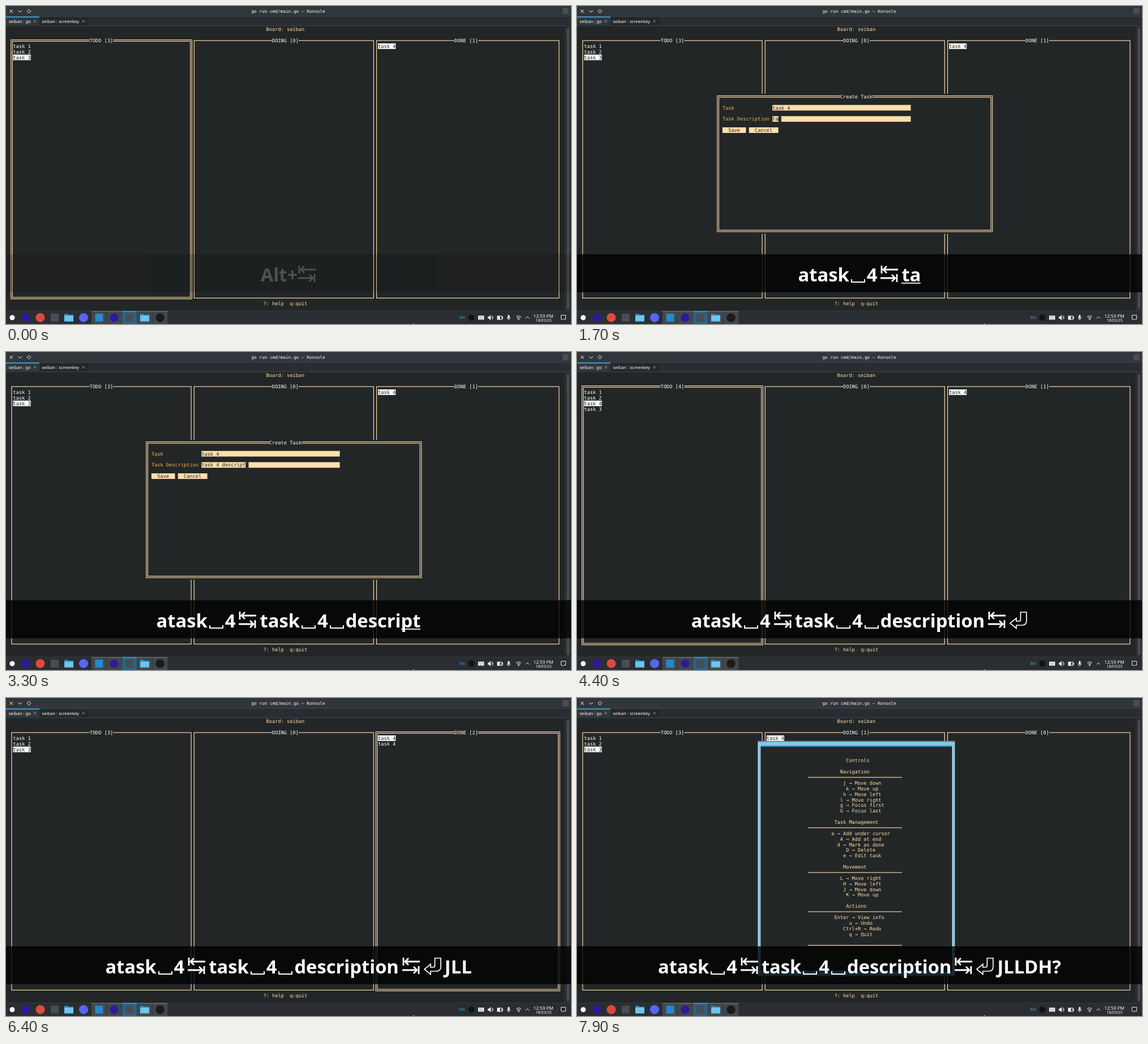
An HTML page that plays this animation: 998 px wide and 561 px high, repeating every 8000 ms.

```html
<!DOCTYPE html>
<html lang="en">
<head>
<meta charset="utf-8">
<title>Kanban board in a terminal</title>
<style>
html, body { margin: 0; width: 100%; height: 100%; overflow: hidden; background: #232627; }
#stage { position: absolute; left: 0; top: 0; width: 998px; height: 561px; overflow: hidden; }
#stage > svg { position: absolute; left: 0; top: 0; }
text { white-space: pre; text-rendering: geometricPrecision; }
.mono { font-family: "DejaVu Sans Mono", monospace; font-size: 8.634px; }
.ui { font-family: "Noto Sans", sans-serif; font-size: 7.7px; fill: #fcfcfc; }
.line { fill: none; stroke: #fcfcfc; stroke-width: 1; }
#band {
  position: absolute; left: 0; top: 438px; width: 998px; height: 67px;
  background: rgba(0, 0, 0, .8); color: #fff; text-align: center; white-space: pre;
  font: bold 32.7px/67px "Noto Sans", "Open Sans", sans-serif;
}
#keys { position: relative; top: 1.8px; height: 67px; }
#keys svg { height: 32px; vertical-align: -3px; fill: none; stroke: #fff; }
#keys i { display: inline-block; width: 5px; }
#keys u {
  text-decoration: none;
  background: linear-gradient(#fff, #fff) 0 37px / 100% 1.7px no-repeat;
}
</style>
</head>
<body>
<div id="stage">
  <svg width="998" height="561" viewBox="0 0 998 561">
    <rect width="998" height="561" fill="#232627"/>
    <g id="term" class="mono"></g>

    <!-- title bar -->
    <rect width="998" height="18.5" fill="#31363b"/>
    <g class="line">
      <path d="M6.5 6.5l5.5 5.5m0-5.5l-5.5 5.5M21.7 7.8l3.3 3.2 3.3-3.2M40.5 6l3.3 3.3-3.3 3.3-3.3-3.3z"/>
    </g>
    <text class="mono" x="433.4" y="12" style="font-size:7.74px" fill="#fcfcfc">go run cmd/main.go — Konsole</text>
    <rect x="983" y="3.5" width="11" height="11" fill="#474d52"/>

    <!-- tabs -->
    <rect y="18.5" width="998" height="16.5" fill="#292c30"/>
    <rect y="18.3" width="998" height=".7" fill="#45494e"/>
    <rect y="19" width="59" height="16.5" fill="#31363b"/>
    <rect y="18.6" width="59" height="1.6" fill="#3daee9"/>
    <rect x="59.5" y="20" width="86" height="14.5" fill="#24272a"/>
    <rect x="59" y="34.5" width="939" height=".8" fill="#4b5055"/>
    <text class="ui" x="4.7" y="29.8">seiban : go</text>
    <text class="ui" x="63.3" y="29.8">seiban : screenkey</text>
    <path class="line" style="stroke:#a9adb0;stroke-width:.8" d="M49 24.8l4 4m0-4l-4 4M134.7 24.8l4 4m0-4l-4 4"/>

    <!-- scroll bar -->
    <rect x="987.5" y="35.3" width="10.5" height="502.7" fill="#292c30"/>
    <rect x="987.3" y="35.3" width=".6" height="502.7" fill="#3b4044"/>
    <rect x="990.5" y="39" width="4.6" height="496" rx="2.3" fill="#484d51"/>

    <!-- panel -->
    <rect y="538" width="998" height="23" fill="#2a2e32"/>
    <rect y="537.6" width="998" height=".7" fill="#3c4146"/>
    <g id="panel"></g>
    <text class="ui" x="801" y="552.2" style="font-size:7px;fill:#3daee9">EN</text>
    <circle cx="822" cy="549.7" r="5.6" fill="#121315"/>
    <g fill="#fcfcfc">
      <rect x="834" y="546.3" width="10.4" height="7"/>
      <path d="M851 548h2l3-3v9.600l-3-3h-2z"/>
      <path d="M867.500 546.500h9v1.500h1.300v4h-1.300v1.500h-9zM872.500 547.500v5h3v-5z" fill-rule="evenodd"/>
      <rect x="886.300" y="545" width="3.200" height="6" rx="1.600"/>
      <circle cx="905.500" cy="553.200" r="1"/>
      <rect x="719" y="560" width="1.500" height="1"/>
    </g>
    <path d="M835.300 548.300h8m-8 1.800h8m-7 1.800h6" stroke="#2a2e32" stroke-width=".6" stroke-dasharray="1 .6"/>
    <g class="line" style="stroke-width:.9">
      <path d="M857.500 547.700q1.800 2 0 4M858.600 546q3.200 3.700 0 7.400"/>
      <path d="M885 549.500q0 3 2.900 3t2.900-3M887.900 552.500v2"/>
      <path d="M901 548.600q4.500-4 9 0M902.400 550.300q3.100-2.700 6.200 0M903.700 551.900q1.800-1.500 3.600 0"/>
      <path d="M917.700 551.300l3.300-3.200 3.300 3.200"/>
      <path d="M980.500 545.500h8v7h-3l-1.500 1.500-1.500-1.500h-2z"/>
    </g>
    <text class="ui" x="931.6" y="550.2" style="font-size:8.1px">12:59 PM</text>
    <text class="ui" x="935.5" y="556.7" style="font-size:6.8px">18/03/25</text>
  </svg>
  <div id="band"><div id="keys"></div></div>
</div>

<script>
const LOOP = 8000;
const W = 5.198, H = 9.876, X0 = 2.2, Y0 = 36.3;
const BG = '#232627', PEACH = '#ffdead', WHITE = '#fcfcfc', GOLD = '#efb54c', BLUE = '#3daee9';
const el = id => document.getElementById(id);

// Pressed keys and their times
const KEYS = [...'atask 4⇥task 4 description⇥⏎JLLDH?'];
const TIMES = [
  500, 880, 980, 1080, 1180, 1270, 1360, 1470, 1600, 1680,
  1840, 1950, 2100, 2300, 2500, 2650,
  2750, 2830, 2920, 3000, 3080, 3160, 3240, 3310, 3390, 3460,
  3570, 3690, 4950, 5850, 6180, 6850, 7560, 7690
];
const FIRST_TAB = 8, SECOND_TAB = 27, ENTER = 28, HELP = 34;

// Terminal drawing on the character grid
const cx = c => X0 + c * W, cy = r => Y0 + r * H;
const fill = (c, r, w, h, color) =>
  `<rect x="${cx(c)}" y="${cy(r)}" width="${w * W}" height="${h * H}" fill="${color}"/>`;
const text = (c, r, s, color = PEACH) =>
  `<text x="${cx(c)}" y="${cy(r + .5) + 3.1}" fill="${color}">${s}</text>`;
const label = (c, r, s, bg, color = BG) => fill(c, r, s.length, 1, bg) + text(c, r, s, color);

function frame(c0, r0, c1, r1, double, color = PEACH) {
  const x = cx(c0 + .5), y = cy(r0 + .5), w = (c1 - c0) * W, h = (r1 - r0) * H;
  return (double ? [-1.3, 1.3] : [0]).map(d =>
    `<rect x="${x + d}" y="${y + d}" width="${w - 2 * d}" height="${h - 2 * d}" ` +
    `fill="none" stroke="${color}" stroke-width="1.15"/>`).join('');
}

const COLUMNS = [['TODO', 1, 62, 28], ['DOING', 63, 124, 90], ['DONE', 125, 187, 152]];

function boardAt(n) {
  let todo = [1, 2, 3], doing = [], done = [4], sel = 2, focus = 0;
  if (n === ENTER) todo = [1, 2, 4, 3];
  if (n === ENTER + 1) { todo = [1, 2, 3, 4]; sel = 3; }
  if (n === ENTER + 2) { doing = [4]; focus = 1; }
  if (n === ENTER + 3) { done = [4, 4]; focus = 2; }
  if (n === ENTER + 4) focus = 2;
  if (n > ENTER + 4) { doing = [4]; done = []; focus = 1; }
  return { lists: [todo, doing, done], sel: [sel, 0, 0], focus };
}

function drawBoard(n, modal) {
  const { lists, sel, focus } = boardAt(n);
  return text(88, 0, 'Board: seiban') + text(87, 49, '?: help  q:quit') +
    COLUMNS.map(([name, left, right, at], i) =>
      frame(left, 2, right, 48, !modal && i === focus) +
      label(at, 2, `${name} [${lists[i].length}]`, BG, WHITE) +
      lists[i].map((id, k) => k === sel[i]
        ? label(left + 1, 3 + k, `task ${id}`, WHITE)
        : text(left + 1, 3 + k, `task ${id}`, WHITE)).join('')
    ).join('');
}

function drawForm(n) {
  const typed = [KEYS.slice(1, Math.min(n, FIRST_TAB - 1)), KEYS.slice(FIRST_TAB, Math.max(FIRST_TAB, Math.min(n, SECOND_TAB - 1)))];
  const active = n < FIRST_TAB ? 0 : n < SECOND_TAB ? 1 : 2;
  const field = (row, name, i) =>
    text(49, row, name, GOLD) + fill(66, row, 47, 1, PEACH) + text(66, row, typed[i].join(''), BG) +
    (active === i ? fill(66 + typed[i].length, row, 1, 1, BG) : '');
  return fill(47, 12, 94, 25, BG) + frame(47, 12, 140, 36, true) +
    label(89, 12, 'Create Task', BG, WHITE) +
    field(14, 'Task', 0) + field(16, 'Task Description', 1) +
    label(49, 18, '  Save  ', active === 2 ? WHITE : PEACH) + label(58, 18, '  Cancel  ', PEACH);
}

// Each line: column, then words; "-" is a rule, an empty line a gap
const HELP_TEXT = `91 Controls

89 Navigation
-
90 j → Move down
91 k → Move up
90 h → Move left
89 l → Move right
89 g → Focus first
89 G → Focus last

87 Task Management
-
86 a → Add under cursor
89 A → Add at end
88 d → Mark as done
91 D → Delete
90 e → Edit task

90 Movement
-
89 L → Move right
90 H → Move left
90 J → Move down
91 K → Move up

91 Actions
-
87 Enter → View info
92 u → Undo
90 Ctrl+R → Redo
92 q → Quit

-`.split('\n');

function drawHelp() {
  const lines = HELP_TEXT.map((s, i) => {
    const row = 7 + i;
    if (s === '-') return `<rect x="${cx(78)}" y="${cy(row + .5) - .55}" width="${32 * W}" height="1.1" fill="${PEACH}"/>`;
    return s && text(+s.slice(0, 2), row, s.slice(3));
  });
  return fill(61, 4, 67, 42, BLUE) + fill(62, 5, 65, 40, BG) +
    frame(61, 4, 127, 45, true, '#e3eadf') + lines.join('');
}

// Key display
const ICONS = {
  ' ': '<svg width="31" viewBox="0 0 31 32"><path d="M4 25v5h23v-5" stroke-width="2"/></svg>',
  '⇥': '<svg width="33" viewBox="0 0 33 32"><path d="M3 1v14M5 8h27M12 2L6 8l6 6M30 16v14M1 23h27M21 17l6 6-6 6" stroke-width="2.8"/></svg>',
  '⏎': '<svg width="33" viewBox="0 0 33 32"><path d="M20.500 2H31V17Q31 25 23 25H13V30.500L2 21.500 13 12.500V18H17.500Q20.500 18 20.500 15Z" stroke-width="1.7"/></svg>'
};
const spaced = k => k === '⇥' || k === '⏎';

function keyLine(n, recent) {
  if (!n) return 'Alt+' + ICONS['⇥'];
  let out = '';
  for (let i = 0; i < n; i++) {
    if (i && (spaced(KEYS[i]) || spaced(KEYS[i - 1]))) out += '<i></i>';
    if (i === recent) out += '<u>';
    out += ICONS[KEYS[i]] || KEYS[i];
  }
  return out + (recent < n ? '</u>' : '');
}

// First key of the latest quick burst, underlined for a moment
function recentFrom(n, t) {
  if (!n || t - TIMES[n - 1] >= 200) return n;
  return TIMES.findIndex(k => TIMES[n - 1] - k < 100);
}

function drawPanel() {
  const dot = (x, r, color) => `<circle cx="${x}" cy="549.7" r="${r}" fill="${color}"/>`;
  const square = (x, color) => `<rect x="${x - 7}" y="542.7" width="14" height="14" fill="${color}"/>`;
  const folder = x => `<path d="M${x - 8} 543h6l1.500 1.500h8.500v3h-16z" fill="#2288c4"/>` +
    `<rect x="${x - 8}" y="546" width="16" height="10.500" fill="#6fc4f0"/>` +
    `<rect x="${x - 8}" y="555.500" width="16" height="1" fill="${BLUE}"/>`;
  const button = (x, on) =>
    `<rect x="${x}" y="538" width="26.300" height="23" fill="${on ? '#2c6284' : '#42474b'}"/>` +
    `<rect x="${x}" y="538" width="26.300" height="1.200" fill="${on ? BLUE : '#6a7074'}"/>`;
  return [151, 178, 205, 232, 259].map(x => button(x, x === 205)).join('') +
    dot(11, 4.5, WHITE) + dot(35, 7.5, '#2d1a9c') + dot(60.5, 8, '#dc4a3d') + square(86, '#474d52') +
    folder(111) + dot(137, 8, '#5865f2') + square(164.5, '#2489d0') + dot(191, 7.5, '#2d1a9c') +
    square(218, '#474d52') + folder(245) + dot(272, 7.8, '#1b1b1e');
}

let shownCount = -1, shownKeys = '';

function render(t) {
  const n = TIMES.filter(k => k <= t).length;
  if (n !== shownCount) {
    shownCount = n;
    const form = n > 0 && n < ENTER, help = n === HELP;
    el('term').innerHTML = drawBoard(n, form || help) + (form ? drawForm(n) : '') + (help ? drawHelp() : '');
  }
  const keys = keyLine(n, recentFrom(n, t));
  if (keys !== shownKeys) el('keys').innerHTML = shownKeys = keys;
  el('band').style.opacity = n ? Math.min(1, (t - TIMES[0]) / 150) : Math.max(0, .2 * (1 - t / 100));
}

el('panel').innerHTML = drawPanel();
const start = performance.now();
function tick() {
  render((performance.now() - start) % LOOP);
  requestAnimationFrame(tick);
}
tick();
</script>
</body>
</html>
```
